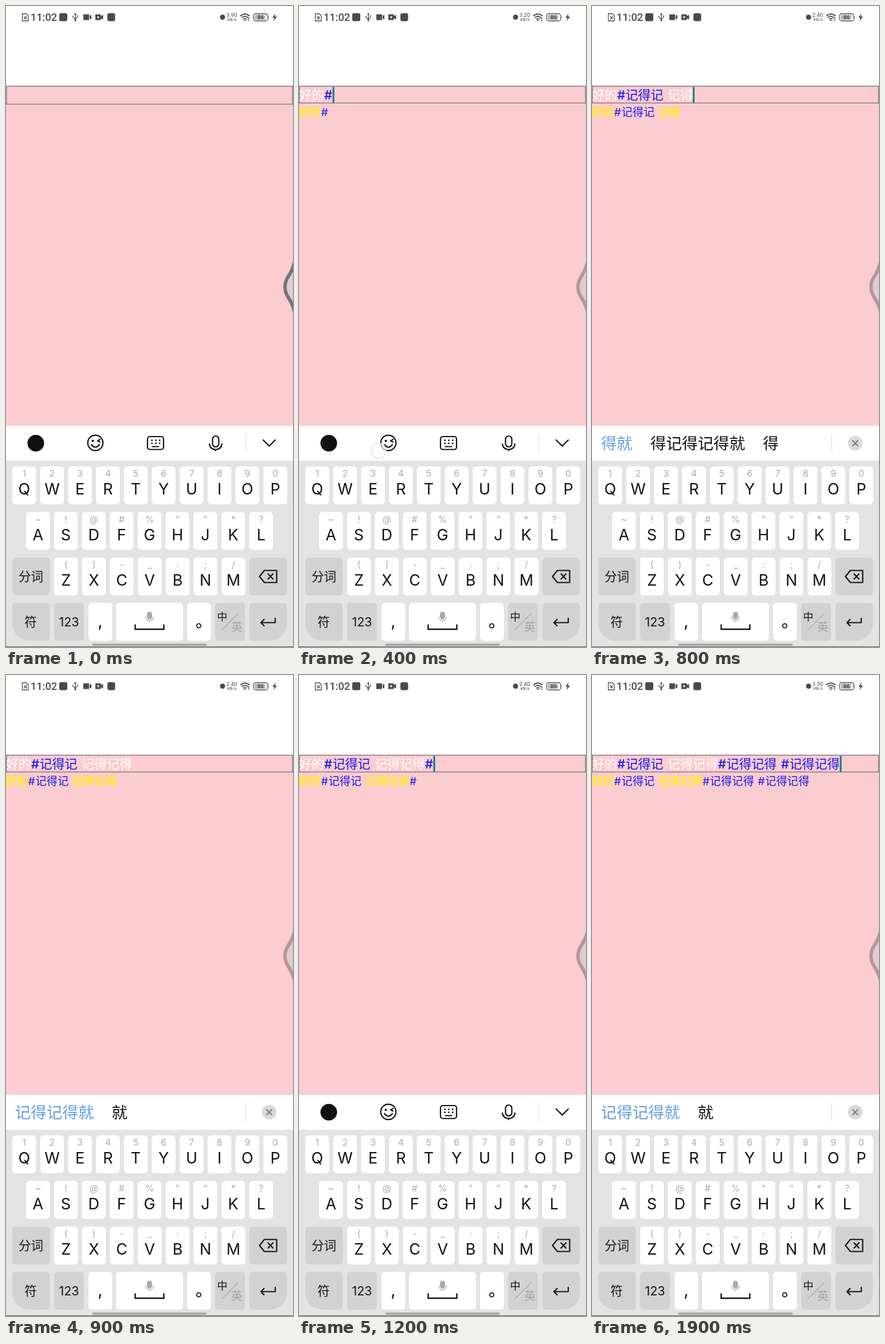
These frames come from a looping animation (501x1118 px, 2 s). An HTML page:

```html
<!DOCTYPE html>
<html lang="zh">
<head>
<meta charset="utf-8">
<style>
html, body { margin: 0; width: 100%; height: 100%; overflow: hidden; background: #fff; }
svg { display: block; width: 100vw; height: 100vh; }
text { font-family: Inter, "Noto Sans CJK SC", "Noto Sans CJK", sans-serif; white-space: pre; }
.cjk { font-family: "Noto Sans CJK SC", "Noto Sans CJK", sans-serif; }
.status { font-family: Roboto, sans-serif; }
.line { fill: none; stroke: #111; stroke-width: 2.2; stroke-linecap: round; stroke-linejoin: round; }
#handle { animation: fade 2s step-end infinite; }
@keyframes fade { 0% { stroke: #757575; } 5% { stroke: #b69698; } }
</style>
</head>
<body>
<svg id="stage" viewBox="0 0 501 1118" preserveAspectRatio="none">
  <rect width="501" height="1118" fill="#fff"/>
  <g id="status" fill="#4a4a4a" stroke="none">
    <g fill="none" stroke="#4a4a4a" stroke-width="1.3">
      <path d="M28.5 13.5h7l3.5 3.5v9h-10.500zM31.500 18l5 5m0-5l-5 5"/>
      <path d="M121 13v12M117 17v3l4 3 4-4v-3M119.500 15l1.500-2 1.500 2"/>
      <rect x="432" y="13.500" width="25" height="12.500" rx="4"/>
    </g>
    <rect x="93" y="12.500" width="14" height="14" rx="3"/>
    <circle cx="121" cy="25" r="1.700"/>
    <path d="M135 14.500h10v10h-10zM146 17l3-1.500v8l-3-1.500z"/>
    <path d="M156 14.500h9.500v3l4-2v8l-4-2v3h-9.500z"/>
    <path d="M159.500 17v5l3.800-2.500z" fill="#fff"/>
    <rect x="177" y="12.500" width="13.500" height="14" rx="3.500"/>
    <circle cx="378" cy="19.500" r="4.500"/>
    <g fill="none" stroke="#4a4a4a" stroke-width="1.700">
      <path d="M409 17.500q8-7 16 0M411.500 20.500q5.500-5 11 0M414 23.300q3-2.800 6 0"/>
    </g>
    <circle cx="417" cy="25" r="1.300"/>
    <path d="M423.500 19.500l1.800 2.500h-3.600zM423.500 26l1.800-2.500h-3.600z"/>
    <rect x="434" y="15.500" width="18.500" height="8.500" rx="2" fill="#b8b8b8"/>
    <path d="M458.300 17.500v4.500q1.500-2.200 0-4.500z"/>
    <path d="M470.500 13l-5.500 7.500h3.500l-1.500 6 6-8h-3.600z"/>
  </g>
  <rect y="139" width="501" height="593" fill="#fbccd0"/>
  <rect id="field" x=".75" y="139.750" width="499.500" height="31.500" fill="none" stroke="#828083" stroke-width="1.500"/>
  <g id="typed"></g>
  <rect id="cursor" y="141" width="3" height="28" fill="#087f82"/>
  <path id="handle" d="M505 440C500 470 487 472 487 490S500 510 505 540" fill="#e2cccf" stroke="#b69698" stroke-width="6"/>
  <g id="keys">
    <rect y="793" width="501" height="325" fill="#e3e3e3"/>
    <rect y="732" width="501" height="61" fill="#fff"/>
    <rect y="731.500" width="501" height="1" fill="#e9dfe0"/>
    <rect x="418" y="746" width="1.200" height="32" fill="#dcdcdc"/>
  </g>
  <g id="tools">
    <circle cx="52" cy="762.500" r="14.500" fill="#111"/>
    <g class="line">
      <circle cx="156" cy="762" r="13.300"/>
      <path d="M149 765q7 9 14 0M164 756l-4 2.500 4 2"/>
      <rect x="247" y="751" width="28" height="22.500" rx="4"/>
      <path d="M255.500 768.500h11"/>
      <rect x="360.500" y="750" width="11" height="19" rx="5.500"/>
      <path d="M355 764q1.500 9.500 11 9.500t11-9.500M366 773.500v2M449 757l10.500 10.500 10.500-10.500"/>
    </g>
    <circle cx="151.500" cy="758.500" r="2" fill="#111"/>
    <path d="M253.500 757.500h16M253.500 762.800h16" stroke="#111" stroke-width="2.500" stroke-dasharray="2.500 4.200"/>
  </g>
  <g id="words">
    <g id="list"></g>
    <circle cx="459.500" cy="762.500" r="12.700" fill="#dadada"/>
    <path class="line" d="M455 758l9 9m0-9l-9 9" style="stroke:#808080"/>
  </g>
  <g id="symbols">
    <rect y="732" width="501" height="386" fill="#e3e3e3"/>
  </g>
  <circle id="touch" cx="139" cy="775.500" r="13" fill="#fff" fill-opacity=".65" stroke="#f3d3d5" stroke-width="1.500"/>
  <rect x="150.500" y="1112" width="200" height="4" rx="2" fill="#a9a9a9"/>
  <rect y="1117" width="501" height="1" fill="#555"/>
</svg>
<script>
const $ = id => document.getElementById(id);
const BLACK = '#111', HINT = '#aaa', GREY = '#d2d2d2';

function add(parent, tag, attrs, content) {
  const el = document.createElementNS('http://www.w3.org/2000/svg', tag);
  for (const k in attrs) el.setAttribute(k, attrs[k]);
  if (content) el.textContent = content;
  parent.appendChild(el);
  return el;
}

// Text placed by its vertical middle.
function label(parent, x, cy, str, size, fill = BLACK, extra = {}) {
  const cjk = /[\u3000-\u9fff]/.test(str);
  return add(parent, 'text', {
    x, y: cy + size * (cjk ? .38 : .364), 'font-size': size, fill,
    'text-anchor': 'middle', ...(cjk && { class: 'cjk' }), ...extra
  }, str);
}

// Rounded box with separate radii for the lower corners.
function box(parent, x, y, w, h, fill, r = 6, left = r, right = r) {
  add(parent, 'path', { fill, d:
    `M${x + r} ${y}h${w - 2 * r}a${r} ${r} 0 0 1 ${r} ${r}v${h - r - right}` +
    `a${right} ${right} 0 0 1 ${-right} ${right}h${left + right - w}` +
    `a${left} ${left} 0 0 1 ${-left} ${-left}v${r + left - h}a${r} ${r} 0 0 1 ${r} ${-r}z` });
}

const stroke = (parent, d, color = BLACK) =>
  add(parent, 'path', { class: 'line', d, style: `stroke:${color}` });

const eraser = (parent, x, y) =>
  stroke(parent, `M${x - 15} ${y}l8.500-10.500h21.500v21h-21.500zM${x} ${y - 4.5}l8.500 9m0-9l-8.500 9`);

function buildKeys(g) {
  const rows = [
    [11, 803, 'QWERTYUIOP', '1234567890'],
    [35, 882.5, 'ASDFGHJKL', '~!@#%“”*?'],
    [84, 962, 'ZXCVBNM', '()-_:;/']
  ];
  for (const [x0, y, letters, hints] of rows) {
    [...letters].forEach((c, i) => {
      const x = x0 + i * 48.7;
      box(g, x, y, 41.5, 66, '#fff');
      label(g, x + 20.75, y + 12.5, hints[i], 16, HINT);
      label(g, x + 20.75, y + 39.5, c, 27);
    });
  }
  box(g, 11, 962, 65.5, 66, GREY);
  label(g, 43.5, 995, '分词', 21.5);
  box(g, 425, 962, 65.5, 66, GREY);
  eraser(g, 457.5, 995);

  box(g, 11, 1041, 65.5, 66, GREY, 6, 30);
  label(g, 43, 1074, '符', 21.5);
  box(g, 84, 1041, 52, 66, GREY);
  label(g, 110, 1074.5, '123', 21.5);
  box(g, 144, 1041, 41.5, 66, '#fff');
  label(g, 164.5, 1072, ',', 29);
  box(g, 192, 1041, 117, 66, '#fff');
  add(g, 'rect', { x: 246, y: 1056.5, width: 9, height: 13.5, rx: 4.5, fill: '#aaa' });
  add(g, 'path', { d: 'M243.500 1065q1 7 7 7t7-7M250.500 1072v3', fill: 'none', stroke: '#aaa', 'stroke-width': 1.3 });
  add(g, 'path', { d: 'M225.500 1078.500v8.500h50v-8.500', fill: 'none', stroke: BLACK, 'stroke-width': 2.4 });
  box(g, 316, 1041, 41.5, 66, '#fff');
  add(g, 'circle', { cx: 336.5, cy: 1081, r: 3.6, fill: 'none', stroke: BLACK, 'stroke-width': 1.8 });
  box(g, 365, 1041, 52, 66, GREY);
  label(g, 377.5, 1065, '中', 18, BLACK, { 'font-weight': 500 });
  label(g, 403, 1083, '英', 19.5, '#a3a3a3');
  add(g, 'path', { d: 'M377 1088l28.500-28.500', stroke: '#a8a8a8', 'stroke-width': 1.2 });
  box(g, 425, 1041, 65.5, 66, GREY, 6, 6, 30);
  stroke(g, 'M470 1068v7.500h-25M450.500 1070l-5.500 5.500 5.500 5.500');
}

function buildSymbols(g) {
  box(g, 7, 739, 74, 294, GREY);
  box(g, 7, 739, 74, 58.5, '#fff');
  ['最近', '中文', '英文', '表情', '网络'].forEach((s, i) => label(g, 44, 768 + i * 58.8, s, 20));
  add(g, 'rect', { x: 75.5, y: 744, width: 2.5, height: 81, rx: 1.2, fill: '#c4c4c4' });

  box(g, 89, 739, 405.5, 293.5, '#fff');
  const cells = ['#', ',', '@', '_', '~', '!', ')', '(', '-', ':', '~', '“ ”', '>', '<', '=', '《》'];
  const unmarked = [1, 10, 11, 15];
  cells.forEach((s, i) => {
    const x = 89 + (i % 4) * 101.4, y = 739 + Math.floor(i / 4) * 73.3;
    label(g, x + (i === 1 ? 43 : 50), y + (i === 15 ? 37.5 : 38), s, i === 15 ? 30 : 26);
    if (!unmarked.includes(i)) label(g, x + 86, y + 13.5, '英', 15.5, '#999');
  });
  let grid = '';
  for (let i = 1; i < 4; i++) grid += `M${89 + i * 101.4} 739v293.500M89 ${739 + i * 73.3}h405.500`;
  add(g, 'path', { d: grid, stroke: '#e6e6e6', 'stroke-width': 1.2 });
  add(g, 'rect', { x: 492, y: 739, width: 2.5, height: 146, rx: 1.2, fill: '#d4d4d4' });

  for (let i = 0; i < 5; i++)
    box(g, 7 + i * 99.4, 1044, 90, 63, GREY, 7, i ? 7 : 30, i === 4 ? 30 : 7);
  add(g, 'rect', { class: 'line', x: 41, y: 1074, width: 22, height: 15, rx: 2 });
  stroke(g, 'M46 1074v-5.500q0-6 6-6 5 0 6 4M52 1079v4');
  stroke(g, 'M140.500 1081l10.500-10 10.500 10', '#999');
  stroke(g, 'M239.500 1071l10.500 10 10.500-10');
  eraser(g, 350, 1076);
  label(g, 448.5, 1076, '返回', 21.5);
}

const MESSAGE = '好的#记得记 记得记得#记得记得 #记得记得';

// Draws plain words and hashtags; returns the end of the line.
function drawMessage(str, cy, size, plain, weight, tagWeight) {
  let x = 0, tag = false;
  for (const part of str.match(/#|\s|[^#\s]+/g) || []) {
    if (part === ' ') { tag = false; x += size * .336; continue; }
    if (part === '#') tag = true;
    label($('typed'), x, cy, part, size, tag ? '#1818ee' : plain,
      { 'text-anchor': 'start', 'font-weight': tag ? tagWeight : weight });
    x += part === '#' ? size * .664 : part.length * size;
  }
  return x;
}

function drawWords(words) {
  let x = 15.5;
  words.forEach((w, i) => {
    label($('list'), x, 763, w, 27.6, i ? BLACK : '#609eea', { 'text-anchor': 'start' });
    x += w.length * 27.6 + 31;
  });
}

const NEXT = ['得就', '得记得记得就', '得'], AGAIN = ['记得记得就', '就'];
const TOOLS = 'tools', SYMBOLS = 'symbols';

// One step per 100 ms: characters typed, panel or suggestions, network speed, cursor shown.
const STEPS = [
  [0, TOOLS, '3.90', 0], [2, TOOLS, '3.90', 1], [2, TOOLS, '3.20', 1], [2, SYMBOLS, '3.20', 1],
  [3, TOOLS, '3.20', 1], [5, NEXT, '3.60', 1], [6, NEXT, '3.60', 1], [7, TOOLS, '3.60', 1],
  [9, NEXT, '2.40', 1], [11, AGAIN, '2.40', 0], [11, AGAIN, '2.40', 0], [11, SYMBOLS, '2.40', 1],
  [12, TOOLS, '2.40', 1], [14, NEXT, '2.90', 1], [16, AGAIN, '2.90', 1], [17, TOOLS, '2.90', 1],
  [18, TOOLS, '2.90', 1], [18, TOOLS, '3.30', 1], [20, NEXT, '3.30', 1], [22, AGAIN, '3.30', 1]
];

const show = (id, on) => $(id).setAttribute('visibility', on ? 'visible' : 'hidden');

function render(step) {
  const [count, panel, rate, cursor] = STEPS[step];
  const str = MESSAGE.slice(0, count);
  $('typed').textContent = $('list').textContent = '';
  const end = drawMessage(str, 154.5, 22, '#fff', 400, 500);
  drawMessage(str, 184.5, 19.3, '#ffeb22', 700, 400);
  $('cursor').setAttribute('x', end);
  $('field').setAttribute('height', count ? 29.5 : 31.5);
  speed.textContent = rate;
  const words = Array.isArray(panel);
  if (words) drawWords(panel);
  show('cursor', cursor);
  show('tools', panel === TOOLS);
  show('words', words);
  show('symbols', panel === SYMBOLS);
  show('touch', step === 4);
}

const small = { class: 'status' };
label($('status'), 66, 19.7, '11:02', 18.3, '#4a4a4a', { ...small, 'font-weight': 500 });
const speed = label($('status'), 394, 16, '3.90', 9.6, '#4a4a4a', small);
label($('status'), 394.5, 23.8, 'KB/s', 7.4, '#4a4a4a', small);
label($('status'), 444.5, 19.8, '86', 9.5, '#333', { ...small, 'font-weight': 500 });
buildKeys($('keys'));
buildSymbols($('symbols'));

let last = -1;
function tick() {
  const step = Math.floor(performance.now() % 2000 / 100);
  if (step !== last) render(last = step);
  requestAnimationFrame(tick);
}
tick();
</script>
</body>
</html>
```
